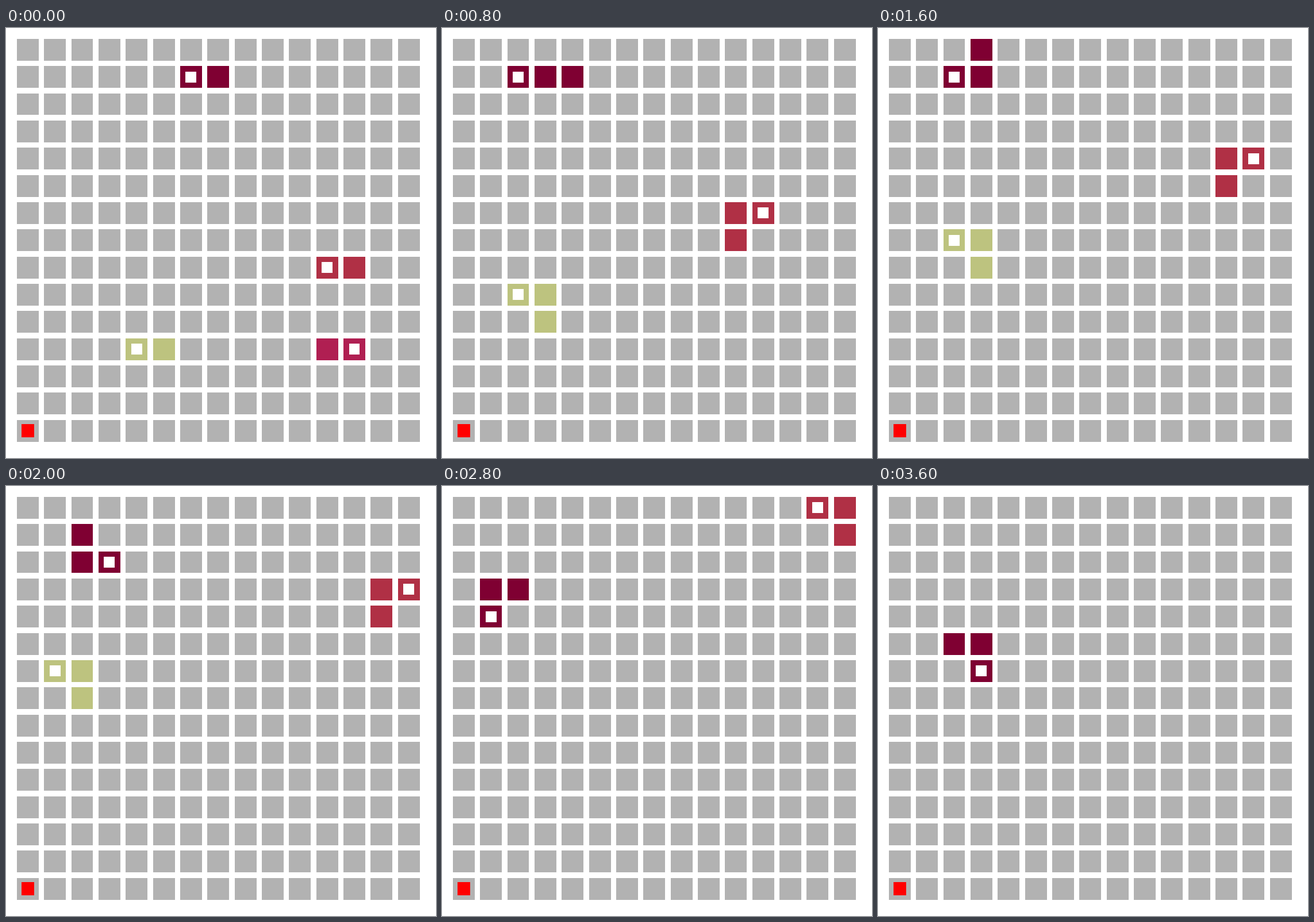
Animation, 748 px wide and 748 px high, one loop 3.8 s. Source, as an HTML page with a canvas:

```html
<!DOCTYPE html>
<html lang="en">
<head>
<meta charset="utf-8">
<title>Snakes on a grid</title>
<style>
  html, body { margin: 0; width: 100%; height: 100%; overflow: hidden; background: #fff; }
  canvas { display: block; width: 748px; height: 748px; }
</style>
</head>
<body>
<canvas id="board" width="748" height="748"></canvas>
<script>
const ctx = document.getElementById('board').getContext('2d');
const SIZE = 748, CELLS = 15, UNIT = SIZE / 79;
const STEP = 200, STEPS = 19, LENGTH = 3;
const DIRS = { L: [-1, 0], R: [1, 0], U: [0, -1], D: [0, 1] };

// Each snake starts at its tail; the first move places its head.
const snakes = [
  { color: '#7f0032', tail: [7, 1], moves: 'LLLLLURDLDRDLLDRDRD' },
  { color: '#b03045', tail: [12, 8], moves: 'LULURURURURUUULDLU' },
  { color: '#bdc37f', tail: [5, 11], moves: 'LULULURULULULU' },
  { color: '#b01f52', tail: [11, 11], moves: 'RR' }
].map(({ color, tail, moves }) => {
  const trail = [tail];
  for (const move of moves) {
    const [x, y] = trail[trail.length - 1];
    const [dx, dy] = DIRS[move];
    trail.push([x + dx, y + dy]);
  }
  return { color, trail };
});

// Fills a grid cell, inset by a number of units, snapped to whole pixels.
function square([col, row], color, inset = 0) {
  const near = i => Math.round((2 + 5 * i + inset) * UNIT);
  const far = i => Math.round((6 + 5 * i - inset) * UNIT);
  ctx.fillStyle = color;
  ctx.fillRect(near(col), near(row), far(col) - near(col), far(row) - near(row));
}

function draw(step) {
  ctx.fillStyle = '#fff';
  ctx.fillRect(0, 0, SIZE, SIZE);
  for (let row = 0; row < CELLS; row++)
    for (let col = 0; col < CELLS; col++) square([col, row], '#b2b2b2');
  square([0, 14], '#f00', 0.8);
  for (const { color, trail } of snakes) {
    const head = step + 1;
    if (head >= trail.length) continue;
    trail.slice(Math.max(0, head - LENGTH + 1), head + 1).forEach(cell => square(cell, color));
    square(trail[head], '#fff', 1);
  }
}

const start = performance.now();
function tick() {
  draw(Math.floor((performance.now() - start) / STEP) % STEPS);
  requestAnimationFrame(tick);
}
tick();
</script>
</body>
</html>
```
